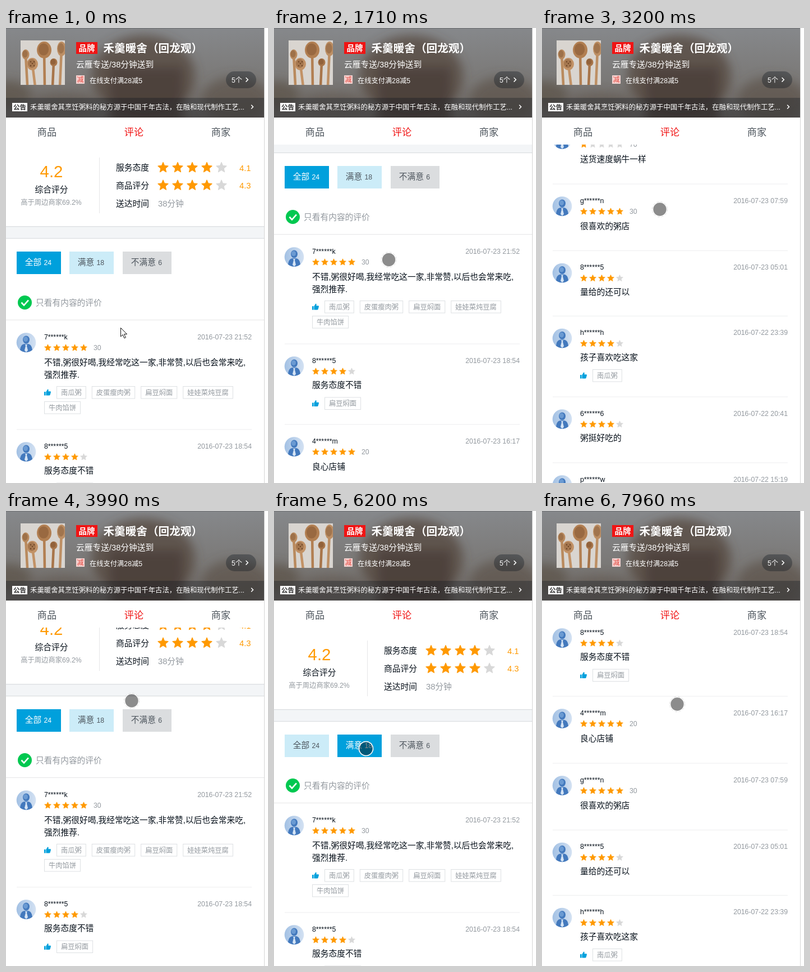
An HTML page that plays this animation: 467 px wide and 808 px high, repeating every 8 s.

```html
<!DOCTYPE html>
<html lang="zh-CN">
<head>
<meta charset="utf-8">
<title>商家评论</title>
<style>
html, body { margin: 0; width: 100%; height: 100%; overflow: hidden; background: #fff; }
svg { display: block; font-family: "Liberation Sans", "Noto Sans CJK SC", "Noto Sans CJK", sans-serif; }
</style>
</head>
<body>
<svg id="stage" width="467" height="808" viewBox="0 0 467 808"></svg>
<script>
const INK = '#07111b', GREY = '#93999f', SLATE = '#4d555d', BLUE = '#00a0dc', RED = '#f01414', GOLD = '#ff9900';
const LINE = 'rgba(7,17,27,.1)';
const S = 12.27, M = 14.72, L = 17.2;
const LOOP = 8000, FILTER_AT = 6200, BAD_HEIGHT = 119;

// Text is placed by its vertical middle.
const text = (x, y, size, fill, str, extra = '') =>
  `<text x="${x}" y="${y + size * .37}" font-size="${size}" fill="${fill}" ${extra}>${str}</text>`;
const rect = (x, y, w, h, fill, extra = '') =>
  `<rect x="${x}" y="${y}" width="${w}" height="${h}" fill="${fill}" ${extra}/>`;
const ellipse = (x, y, rx, ry, fill, extra = '') =>
  `<ellipse cx="${x}" cy="${y}" rx="${rx}" ry="${ry}" fill="${fill}" ${extra}/>`;
const stroke = (d, color, width) =>
  `<path d="${d}" fill="none" stroke="${color}" stroke-width="${width}" stroke-linecap="round"/>`;
const MID = 'text-anchor="middle"', END = 'text-anchor="end"', BOLD = 'font-weight="bold"';

function star(x, y, r, fill) {
  const pts = Array.from({ length: 10 }, (_, i) => {
    const a = i * Math.PI / 5, d = i % 2 ? r * .46 : r;
    return (x + d * Math.sin(a)).toFixed(1) + ',' + (y - d * Math.cos(a)).toFixed(1);
  });
  return `<polygon points="${pts.join(' ')}" fill="${fill}" stroke="${fill}" stroke-width="${r / 9}" stroke-linejoin="round"/>`;
}
const stars = (x, y, r, gap, n) =>
  [0, 1, 2, 3, 4].map(i => star(x + i * gap, y, r, i < n ? GOLD : '#d8d8d8')).join('');

function spoon(x, y, rx, ry, x2, y2, color) {
  return stroke(`M${x} ${y}L${x2} ${y2}`, color, 4.5) + ellipse(x, y, rx, ry, color) +
    ellipse(x - 1, y - 1, rx * .7, ry * .72, 'rgba(90,50,20,.28)');
}

function header() {
  const photo = rect(26, 22, 79, 79, '#d9d5d0') +
    spoon(35, 47, 6.5, 9, 38, 100, '#b98a5e') +
    spoon(68, 39, 13, 15, 69, 104, '#b27f52') +
    spoon(47, 64, 10, 11, 52, 104, '#c29266') +
    spoon(85, 61, 6.5, 7, 83, 104, '#a8754a') +
    spoon(99, 37, 8, 13, 96, 104, '#bd8f64') +
    [[44, 60], [50, 60], [44, 67], [50, 67], [47, 63]].map(p => ellipse(...p, 1.1, 1.3, '#6d4526')).join('');
  return `<svg width="460" height="159">` + rect(0, 0, 460, 159, 'url(#sky)') +
    `<g filter="url(#soft)">` +
    ellipse(245, 85, 92, 72, '#54483f', 'opacity=".75"') + rect(185, 70, 130, 110, '#4a3e37', 'opacity=".8"') +
    ellipse(5, 120, 40, 26, '#5f554d', 'opacity=".8"') + ellipse(105, 138, 60, 22, '#665c54', 'opacity=".7"') +
    ellipse(410, 128, 60, 42, '#5e544c', 'opacity=".7"') + `</g>` +
    rect(0, 124, 460, 35, 'rgba(7,17,27,.28)') + rect(0, 0, 460, 1, '#6d6f72') + `</svg>` +
    `<svg x="26" y="22" width="79" height="79" viewBox="26 22 79 79">${photo}</svg>` +
    rect(125, 25, 38, 21, RED) + text(144, 35.5, 14.5, '#fff', '品牌', MID + BOLD) +
    text(173.5, 35.5, 19.63, '#fff', '禾羹暖舍（回龙观）', BOLD) +
    text(125, 64.5, M, '#fff', '云雁专送/38分钟送到') +
    rect(125, 84, 15, 15, '#f6d3d1') + text(132.5, 91.5, 12, '#e5483f', '减', MID) +
    text(149, 93.5, S, '#fff', '在线支付满28减5') +
    rect(392, 77, 54, 30, 'rgba(7,17,27,.32)', 'rx="15"') + text(402, 92, S, '#fff', '5个') +
    stroke('M428 88.5l3.3 3.3l-3.3 3.3', '#fff', 1.5) +
    rect(11, 133, 27, 15, '#fff') + text(24.5, 140.5, 11.5, '#333', '公告', MID + BOLD) +
    text(43, 140.5, 12.4, '#fff', '禾羹暖舍其烹饪粥料的秘方源于中国千年古法，在融和现代制作工艺...') +
    stroke('M437.5 137l3 3l-3 3', '#fff', 1.5) +
    text(73, 185, L, SLATE, '商品', MID) + text(228, 185, L, RED, '评论', MID) + text(383, 185, L, SLATE, '商家', MID);
}

function overview() {
  const row = (y, label, score) => text(196, y, M, INK, label) +
    stars(280, y, 9.6, 26, 4) + text(416, y + .5, M, GOLD, score);
  return text(81, 254.5, 29.4, GOLD, '4.2', MID) + text(81, 286.5, M, INK, '综合评分', MID) +
    text(80.5, 309.5, S, GREY, '高于周边商家69.2%', MID) +
    rect(166, 230, 1, 99, LINE) +
    row(248, '服务态度', '4.1') + row(279.5, '商品评分', '4.3') +
    text(196, 312, M, INK, '送达时间') + text(271, 312, M, GREY, '38分钟') +
    rect(0, 352, 460, 22, '#f3f5f7') + rect(0, 352, 460, 1.2, LINE) + rect(0, 373, 460, 1.2, LINE) +
    `<g id="filters"></g>` +
    ellipse(33.5, 487.5, 12.5, 12.5, '#00c850') +
    `<path d="M27.5 487.5l4.5 4.8l8-9" fill="none" stroke="#fff" stroke-width="2.6"/>` +
    text(53, 487.5, M, GREY, '只看有内容的评价') + rect(0, 518, 460, 1, LINE);
}

function filters(active) {
  return [[19, 79, '全部', 24, '#ccecf8'], [113, 79, '满意', 18, '#ccecf8'], [208, 87, '不满意', 6, '#dbdddf']]
    .map(([x, w, label, count, bg], i) => {
      const on = i === active, color = on ? '#fff' : SLATE;
      return rect(x, 397, w, 40, on ? BLUE : bg) + text(x + 14.7, 416, M, color, label) +
        text(x + 19 + label.length * M, 416.5, S, color, count);
    }).join('');
}

const avatar = (x, y) => `<g transform="translate(${x} ${y})">` +
  ellipse(0, 0, 17.3, 17.3, 'url(#face)') +
  `<path d="M-11 13.2Q-10 3.5-3.5 2.5H3.5Q10 3.5 11 13.2A17.3 17.3 0 0 1-11 13.2Z" fill="#4379bd"/>` +
  ellipse(0, -5, 6, 7, '#4379bd') + ellipse(-1, -6, 4, 4.5, '#6a9ad2') +
  `<path d="M-2 3.5h4l-1 2.5l2 8l-3 3l-3-3l2-8z" fill="#d5e4f5"/></g>`;

function tags(y, list) {
  let x = 90;
  return `<path transform="translate(68 ${y - 6})" fill="${BLUE}" d="M0 5h2.6v6.5H0zM3.4 5.2L6.2 0.4Q8.4 0.6 7.4 4.2H11.3Q12.3 4.6 11.8 6.2L10.6 10.6Q10.2 11.5 9.2 11.5H3.4z"/>` +
    list.map(tag => {
      const w = tag.length * S + 16;
      if (x + w > 438) { x = 68; y += 27; }
      const box = rect(x + .5, y - 10.5, w - 1, 21.5, '#fff', 'stroke="#dde0e3"') + text(x + 8, y, S, GREY, tag);
      x += w + 10;
      return box;
    }).join('');
}

function review(y, r) {
  const gap = r.mins ? 45.5 : 44;
  return avatar(36, y + 10.5) + text(68, y, S, INK, r.user) + text(438, y, S, GREY, '2016-07-' + r.date, END) +
    stars(74.5, y + 20, 6.2, 16, r.score) + (r.mins ? text(156, y + 19.5, S, GREY, r.mins) : '') +
    r.lines.map((line, i) => text(68, y + gap + i * 22, M, INK, line)).join('') +
    (r.tags ? tags(y + 54 + r.lines.length * 22.5, r.tags) : '') +
    rect(19, y + r.h - 29.5, 419, 1, 'rgba(7,17,27,.07)');
}

const reviews = [
  { user: '7******k', date: '23 21:52', score: 5, mins: 30, h: 194,
    lines: ['不错,粥很好喝,我经常吃这一家,非常赞,以后也会常来吃,', '强烈推荐.'],
    tags: ['南瓜粥', '皮蛋瘦肉粥', '扁豆焖面', '娃娃菜炖豆腐', '牛肉馅饼'] },
  { user: '8******5', date: '23 18:54', score: 4, h: 143, lines: ['服务态度不错'], tags: ['扁豆焖面'] },
  { user: '4******m', date: '23 16:17', score: 5, mins: 20, h: 119, lines: ['良心店铺'] },
  { user: '9******t', date: '23 10:11', score: 1, mins: 70, h: BAD_HEIGHT, lines: ['送货速度蜗牛一样'], bad: true },
  { user: 'g******n', date: '23 07:59', score: 5, mins: 30, h: 118.5, lines: ['很喜欢的粥店'] },
  { user: '8******5', date: '23 05:01', score: 4, h: 116, lines: ['量给的还可以'] },
  { user: 'h******h', date: '22 23:39', score: 4, h: 143.5, lines: ['孩子喜欢吃这家'], tags: ['南瓜粥'] },
  { user: '6******6', date: '22 20:41', score: 4, h: 117, lines: ['粥挺好吃的'] },
  { user: 'p******w', date: '22 15:19', score: 5, h: 117, lines: ['很好吃'] }
];

function list() {
  const parts = { top: '', bad: '', rest: '' };
  let y = 548, part = 'top';
  for (const r of reviews) {
    if (r.bad) part = 'rest';
    parts[r.bad ? 'bad' : part] += review(y, r);
    y += r.h;
  }
  return `${parts.top}<g id="bad">${parts.bad}</g><g id="rest">${parts.rest}</g>`;
}

const $ = id => document.getElementById(id);
$('stage').innerHTML = `<defs>
  <linearGradient id="sky" x2="0" y2="1"><stop stop-color="#86888b"/><stop offset=".6" stop-color="#7a7876"/><stop offset="1" stop-color="#69625d"/></linearGradient>
  <linearGradient id="face" x2="1" y2="0"><stop stop-color="#a3c1e4"/><stop offset="1" stop-color="#d3e1f2"/></linearGradient>
  <filter id="soft" x="-20%" y="-40%" width="140%" height="180%"><feGaussianBlur stdDeviation="9"/></filter></defs>` +
  header() +
  `<svg y="207" width="460" height="601" viewBox="0 207 460 601"><g id="page">${overview()}${list()}</g></svg>` +
  rect(460, 0, 1, 808, '#d4d4d4') +
  `<path id="arrow" d="M.5 .5V16l3.6-3.4l2.8 6.2l2.5-1.1l-2.8-6h5z" fill="#fff" stroke="#111"/>
  <g id="touch"><circle r="13.2" fill="none" stroke="#aaa" stroke-width=".8" stroke-dasharray="4 3"/>
  <circle r="12.4" fill="none" stroke="#fff" stroke-width="1.6"/><circle r="11.7" fill="rgba(0,0,0,.45)"/></g>`;

// The screen refreshes only at these moments.
const ticks = [0, 460, 610, 730, 1310, 1430, 1550, 1710, 1830, 1980, 2130, 2250, 2370, 2510, 2630, 2780, 2930, 3050,
  3200, 3480, 3600, 3750, 3870, 3990, 4110, 4260, 4380, 4530, 4680, 4830, 4980, 6200, 6600, 6760, 6880,
  7030, 7150, 7300, 7420, 7540, 7690, 7810, 7960];

const scrollKeys = [[0, 0], [730, 0], [1310, 9], [1550, 115], [1710, 152], [1830, 167], [1980, 172], [2130, 173],
  [2250, 173], [2370, 240], [2630, 530], [2780, 655], [2930, 740], [3050, 790], [3200, 817], [3480, 800],
  [3600, 700], [3750, 470], [3990, 45], [4110, 2], [4260, -8], [4380, -3], [4980, 0], [6880, 0],
  [7150, 11], [7540, 170], [7690, 290], [7960, 527]];
const pointerKeys = [[0, 204, 532], [460, 381, 689], [730, 197, 532], [1310, 193, 503], [1550, 200, 400],
  [1830, 208, 420], [2250, 217, 630], [2510, 214, 380], [2630, 210, 322], [3200, 210, 322], [3600, 215, 560],
  [3750, 220, 600], [3990, 224, 337], [4260, 164, 422], [6200, 164, 422], [6600, 183, 422], [6880, 262, 508],
  [7150, 258, 490], [7540, 248, 330], [7960, 241, 343]];

function sample(keys, t) {
  const i = keys.findIndex(k => k[0] > t);
  if (i < 0) return keys[keys.length - 1].slice(1);
  const a = keys[i - 1], b = keys[i], p = (t - a[0]) / (b[0] - a[0]);
  return a.slice(1).map((v, j) => v + (b[j + 1] - v) * p);
}

let shown = -1;
function draw(now) {
  const time = now % LOOP, t = ticks.filter(k => k <= time).pop();
  if (t !== shown) {
    shown = t;
    const good = t >= FILTER_AT, touching = t >= 610;
    const [x, y] = sample(pointerKeys, t);
    $('page').setAttribute('transform', `translate(0 ${-Math.round(sample(scrollKeys, t)[0])})`);
    $('filters').innerHTML = filters(good ? 1 : 0);
    $('bad').style.display = good ? 'none' : '';
    $('rest').setAttribute('transform', `translate(0 ${good ? -BAD_HEIGHT : 0})`);
    $('touch').style.display = touching ? '' : 'none';
    $('arrow').style.display = touching ? 'none' : '';
    for (const id of ['touch', 'arrow']) $(id).setAttribute('transform', `translate(${x} ${y})`);
  }
}

const start = performance.now();
function loop() {
  draw(performance.now() - start);
  requestAnimationFrame(loop);
}
loop();
</script>
</body>
</html>
```
